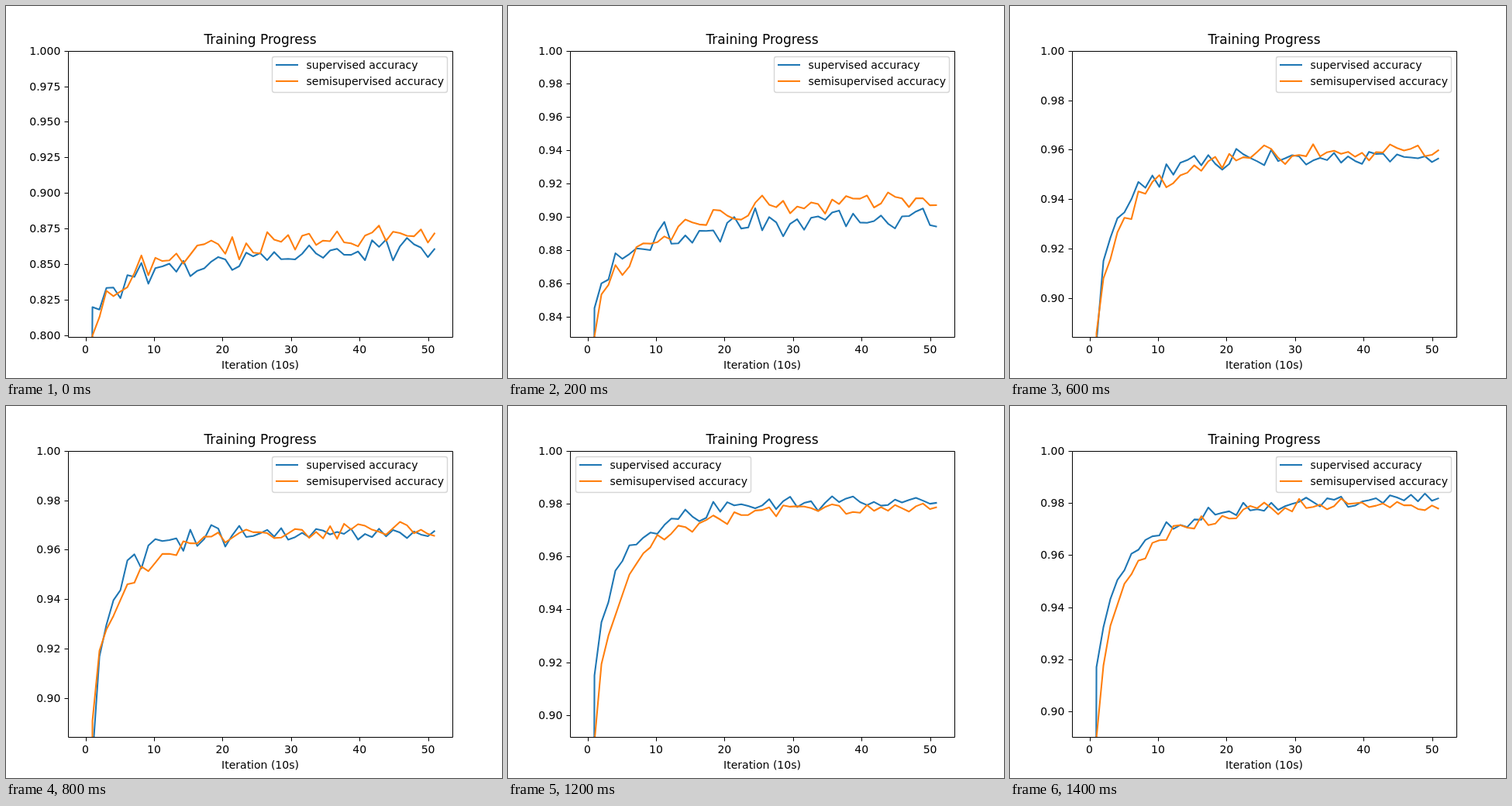
These frames come from a looping animation (640x480 px, 1.6 s). An HTML page with a canvas:

```html
<!DOCTYPE html>
<html lang="en">
<head>
<meta charset="utf-8">
<title>Training Progress</title>
<style>
  html, body { margin: 0; width: 100%; height: 100%; overflow: hidden; background: #fff; }
  canvas { display: block; }
</style>
</head>
<body>
<canvas id="stage" width="640" height="480"></canvas>
<script>
const ctx = document.getElementById('stage').getContext('2d');
const FONT = '"DejaVu Sans", Verdana, sans-serif';
const BLUE = '#1f77b4', ORANGE = '#ff7f0e';
const BOX = { left: 80, right: 576, top: 57.6, bottom: 427.2 };
const HOLD = 200, STEPS = 50, SPAN = 51;

const curve = (start, end, rate) => ({ start, end, rate });

// Each run: lower axis limit and the learning curves of both models.
const runs = [
  { low: 0.7989, sup: curve(0.820, 0.863, 0.20), semi: curve(0.800, 0.872, 0.26) },
  { low: 0.8276, sup: curve(0.845, 0.900, 0.28), semi: curve(0.828, 0.912, 0.27) },
  { low: 0.8570, sup: curve(0.863, 0.930, 0.39), semi: curve(0.858, 0.936, 0.32) },
  { low: 0.8844, sup: curve(0.882, 0.957, 0.50), semi: curve(0.886, 0.960, 0.37) },
  { low: 0.8844, sup: curve(0.876, 0.967, 0.57), semi: curve(0.891, 0.968, 0.39) },
  { low: 0.8710, sup: curve(0.870, 0.977, 0.65), semi: curve(0.895, 0.976, 0.41) },
  { low: 0.8917, sup: curve(0.915, 0.981, 0.40), semi: curve(0.890, 0.979, 0.40), left: true },
  { low: 0.8902, sup: curve(0.917, 0.982, 0.33), semi: curve(0.890, 0.980, 0.39) }
];

function random(seed) {
  let s = seed;
  return () => {
    s = (Math.imul(s, 1664525) + 1013904223) >>> 0;
    return s / 4294967296;
  };
}

// Saturating growth with jitter that shrinks as accuracy nears 1.
function series({ start, end, rate }, seed) {
  const rnd = random(seed * 7919 + 17);
  const amp = 0.0022 + 0.085 * (1 - end);
  const values = [0.1, start];
  for (let i = 2; i <= STEPS; i++) {
    const rest = Math.exp(-rate * (i - 1) ** 0.7);
    const jitter = (rnd() + rnd() - 1) * amp * (1.2 - 0.5 * i / STEPS);
    values.push(end - (end - start) * rest + jitter);
  }
  return values;
}

runs.forEach((r, i) => {
  r.lines = [series(r.sup, i * 2 + 1), series(r.semi, i * 2 + 2)];
});

const px = iteration => 102.545 + iteration * 8.8414;
const py = (v, low) => BOX.top + (1 - v) / (1 - low) * (BOX.bottom - BOX.top);
const snap = v => Math.round(v) + 0.5;

function text(str, x, y, align = 'center', size = 14) {
  ctx.font = size + 'px ' + FONT;
  ctx.textAlign = align;
  ctx.fillStyle = '#000';
  ctx.fillText(str, x, y);
}

function polyline(points, color, width) {
  ctx.strokeStyle = color;
  ctx.lineWidth = width;
  ctx.lineJoin = 'round';
  ctx.beginPath();
  points.forEach(([x, y]) => ctx.lineTo(x, y));
  ctx.stroke();
}

function axes(low) {
  const [step, digits] = 1 - low > 0.18 ? [0.025, 3] : [0.02, 2];
  for (let n = 0; 1 - n * step >= low; n++) {
    const v = 1 - n * step, y = snap(py(v, low));
    polyline([[75.5, y], [80.5, y]], '#000', 1);
    text(v.toFixed(digits), 70.3, y + 4.5, 'right');
  }
  for (let n = 0; n <= 50; n += 10) {
    const x = snap(px(n));
    polyline([[x, 427.5], [x, 432.5]], '#000', 1);
    text(n, px(n), 448);
  }
  ctx.lineWidth = 1;
  ctx.strokeRect(80.5, 58.5, 496, 369);
}

function legend(x) {
  ctx.beginPath();
  ctx.roundRect(x + 0.5, 65.5, 226, 46, 2.8);
  ctx.fillStyle = 'rgba(255,255,255,0.8)';
  ctx.fill();
  ctx.strokeStyle = 'rgba(204,204,204,0.8)';
  ctx.lineWidth = 1.39;
  ctx.stroke();
  const entry = (label, color, y) => {
    polyline([[x + 5, y], [x + 34, y]], color, 2.08);
    text(label, x + 44.5, y + 5, 'left');
  };
  entry('supervised accuracy', BLUE, 76);
  entry('semisupervised accuracy', ORANGE, 97);
}

function draw(r) {
  ctx.fillStyle = '#fff';
  ctx.fillRect(0, 0, 640, 480);
  ctx.save();
  ctx.beginPath();
  ctx.rect(BOX.left, BOX.top, BOX.right - BOX.left, BOX.bottom - BOX.top);
  ctx.clip();
  r.lines.forEach((line, n) => {
    const points = line.map((v, i) => [px(i * SPAN / STEPS), py(v, r.low)]);
    polyline(points, n ? ORANGE : BLUE, 2.08);
  });
  ctx.restore();
  axes(r.low);
  text('Training Progress', 328, 49, 'center', 17);
  text('Iteration (10s)', 328, 468);
  legend(r.left ? 87 : 343);
}

const start = performance.now();
function tick() {
  const t = Math.max(0, performance.now() - start);
  draw(runs[Math.floor(t / HOLD) % runs.length]);
  requestAnimationFrame(tick);
}
tick();
</script>
</body>
</html>
```
